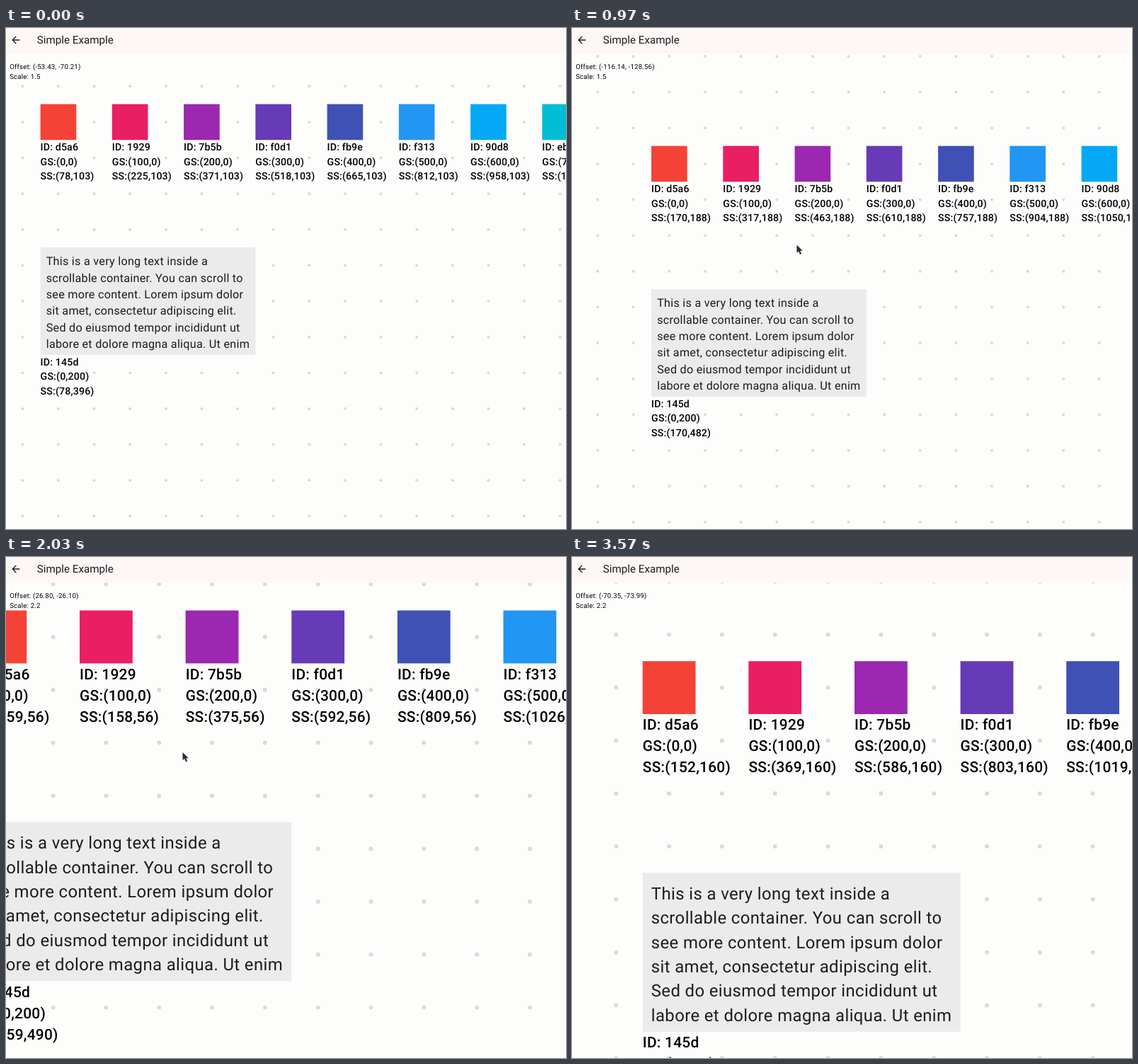
An HTML page for the animation above (3600 ms loop, 791 px wide and 708 px high).

```html
<!DOCTYPE html>
<html lang="en">
<head>
<meta charset="utf-8">
<title>Simple Example</title>
<style>
  html, body { margin: 0; width: 100%; height: 100%; overflow: hidden; background: #fdfdfc; }
  svg { display: block; width: 791px; height: 708px; }
  text { font-family: Roboto, "Noto Sans", sans-serif; white-space: pre; text-rendering: geometricPrecision; }
  .label { font-size: 14px; font-weight: 500; letter-spacing: .15px; }
  .body { font-size: 16px; letter-spacing: .25px; fill: #1d1b20; }
  .info { font-size: 9.66px; letter-spacing: .1725px; }
  .title { font-size: 15.18px; fill: #1d1b20; }
</style>
</head>
<body>
<svg viewBox="0 0 791 708">
  <rect width="791" height="708" fill="#fdfdfc"/>
  <g id="world"></g>
  <text class="info" id="offset" x="5.2" y="57.9"></text>
  <text class="info" id="scale" x="5.2" y="71.7"></text>
  <rect width="791" height="36.5" fill="#fdf7f6"/>
  <path transform="translate(5.5 8.7) scale(.69)" fill="#1d1b20"
    d="M20 11H7.83l5.59-5.59L12 4l-8 8 8 8 1.41-1.41L7.83 13H20z"/>
  <text class="title" x="43.8" y="22.1">Simple Example</text>
  <path id="cursor" d="M0 0V11.2L2.6 9 4.6 13.4 6.6 12.5 4.7 8.2H8.2Z"
    fill="#2b2b2e" stroke="#fff" stroke-width=".8" paint-order="stroke"/>
</svg>
<script>
const LOOP = 3600, STEP = 100 / 3; // the picture advances 30 times a second
const PX = 0.69, LEFT = -5.5, TOP = 36.5; // screen unit to stage pixels
const $ = id => document.getElementById(id);
const world = $('world');

function add(tag, attrs, text = '') {
  const el = document.createElementNS('http://www.w3.org/2000/svg', tag);
  for (const k in attrs) el.setAttribute(k, attrs[k]);
  el.textContent = text;
  world.append(el);
  return el;
}

const ease = {
  hold: () => 0,
  smooth: p => p * p * (3 - 2 * p),
  in: p => p * p,
  out: p => p * (2 - p)
};

// time, pan x, pan y, scale, cursor x, cursor y, easing towards the next key
const keys = [
  [0, 53.43, 70.21, 1.4674, 310, 225, 'hold'],
  [60, 53.43, 70.21, 1.4674, 310, 225, 'smooth'],
  [420, 53.43, 70.21, 1.4674, 256, 248, 'hold'],
  [550, 53.43, 70.21, 1.4674, 256, 248, 'smooth'],
  [730, 172.69, 164.94, 1.4674, 376.5, 343.5, 'smooth'],
  [1270, 37.07, 77.71, 1.4674, 235, 255, 'smooth'],
  [1530, 54.75, 102.9, 1.4674, 249.5, 276, 'hold'],
  [1630, 20.06, 70.25, 1.7011, 249.5, 276, 'hold'],
  [1760, -6.2, 45.5, 1.9348, 249.5, 276, 'hold'],
  [1890, -26.8, 26.1, 2.1684, 249.5, 276, 'hold'],
  [2140, -26.8, 26.1, 2.1684, 249.5, 276, 'in'],
  [2270, 4.87, 43.09, 2.1684, 311.5, 309, 'out'],
  [2470, 70.35, 73.99, 2.1684, 399.5, 351.5, 'hold'],
  [LOOP, 70.35, 73.99, 2.1684, 399.5, 351.5, 'hold']
];

function pose(t) {
  let i = 0;
  while (i < keys.length - 2 && t >= keys[i + 1][0]) i++;
  const a = keys[i], b = keys[i + 1];
  const p = ease[a[6]]((t - a[0]) / (b[0] - a[0]));
  return [1, 2, 3, 4, 5].map(k => a[k] + (b[k] - a[k]) * p);
}

for (let x = -225; x < 850; x += 50)
  for (let y = -225; y < 700; y += 50)
    add('circle', { cx: x, cy: y, r: 2, fill: '#dadada' });

const tags = [];
function node(id, x, y, w, h, fill) {
  add('rect', { x, y, width: w, height: h, fill });
  const line = (n, s) => add('text', { class: 'label', x, y: y + h + 15 + 20 * n }, s);
  line(0, `ID: ${id}`);
  line(1, `GS:(${x},${y})`);
  tags.push({ x, y, el: line(2, '') });
}

[['d5a6', '#f44336'], ['1929', '#e91e63'], ['7b5b', '#9c27b0'], ['f0d1', '#673ab7'],
 ['fb9e', '#3f51b5'], ['f313', '#2196f3'], ['90d8', '#03a9f4'], ['eb69', '#00bcd4']]
  .forEach(([id, fill], i) => node(id, i * 100, 0, 50, 50, fill));

node('145d', 0, 200, 300, 150, '#ebebec');
['This is a very long text inside a',
 'scrollable container. You can scroll to',
 'see more content. Lorem ipsum dolor',
 'sit amet, consectetur adipiscing elit.',
 'Sed do eiusmod tempor incididunt ut',
 'labore et dolore magna aliqua. Ut enim']
  .forEach((s, i) => add('text', { class: 'body', x: 8, y: 225 + 23 * i }, s));

function draw(time) {
  const t = Math.round(Math.floor((time + 4) / STEP) * STEP / 10) * 10;
  const [ox, oy, s, cx, cy] = pose(t);
  const z = s * PX;
  world.setAttribute('transform', `translate(${LEFT + ox * z} ${TOP + oy * z}) scale(${z})`);
  for (const { x, y, el } of tags)
    el.textContent = `SS:(${Math.floor((x + ox) * s)},${Math.floor((y + oy) * s)})`;
  $('offset').textContent = `Offset: (${(-ox).toFixed(2)}, ${(-oy).toFixed(2)})`;
  $('scale').textContent = `Scale: ${s.toFixed(1)}`;
  $('cursor').setAttribute('transform', `translate(${cx} ${cy})`);
  $('cursor').setAttribute('visibility', t >= 60 && t < 2700 ? 'visible' : 'hidden');
}

const start = performance.now();
function tick() {
  draw((performance.now() - start) % LOOP);
  requestAnimationFrame(tick);
}
draw(0);
requestAnimationFrame(tick);
</script>
</body>
</html>
```
